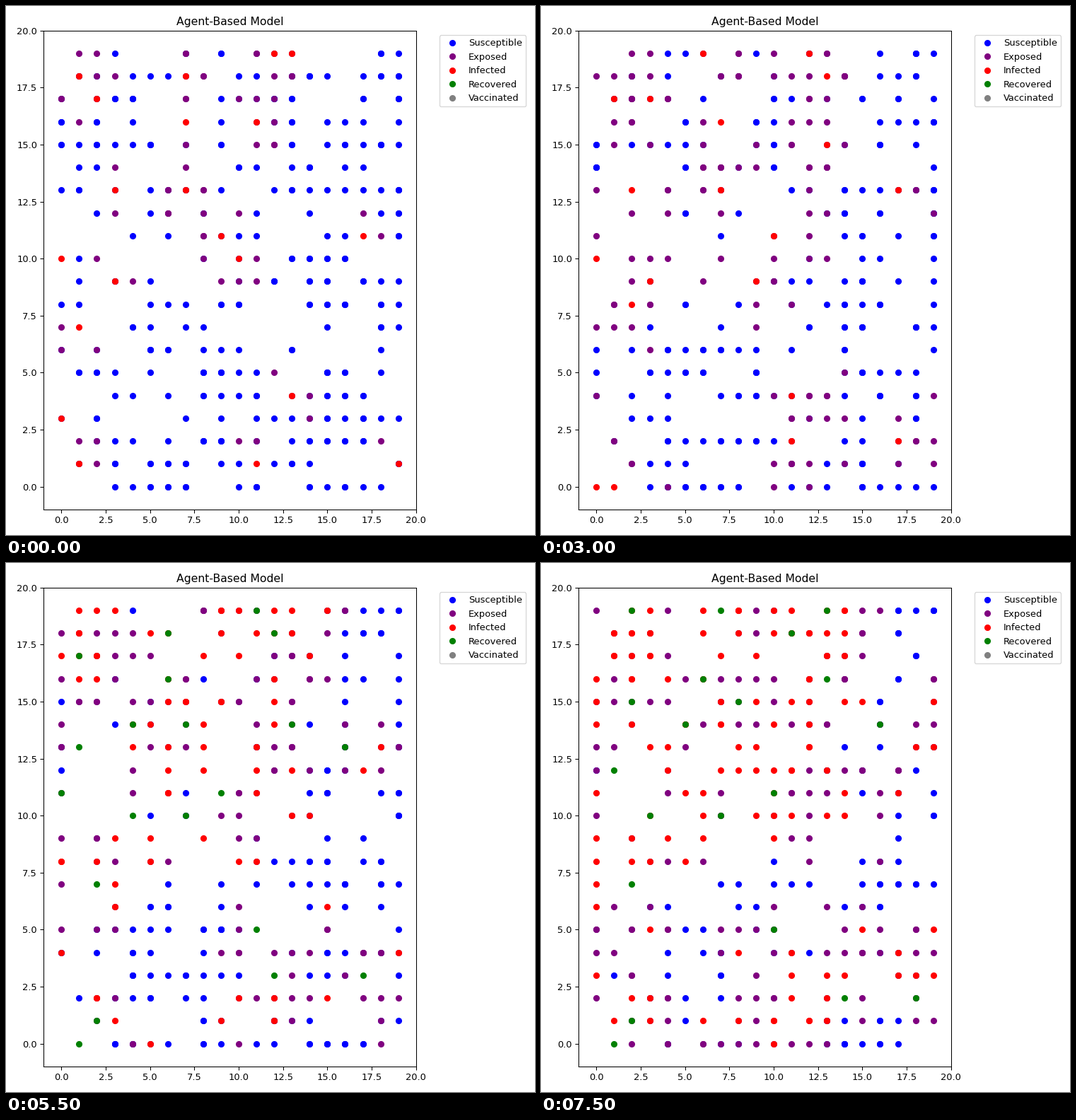
Recreate the animation shown at these times as a matplotlib script. Size 748 px wide and 748 px high, loop 8000 ms.

```python
import numpy as np
import matplotlib.pyplot as plt
from matplotlib.animation import FuncAnimation

STAGE, DPI = 748, 93.5
FRAMES, INTERVAL = 16, 500
SIZE, AGENTS, CASES = 20, 400, 20
INCUBATION, RECOVERY = 11, 9      # in steps
MOVE_CHANCE, START_RISK, RISK = 0.4, 0.5, 0.45

STATES = [("Susceptible", "blue"), ("Exposed", "purple"), ("Infected", "red"),
          ("Recovered", "green"), ("Vaccinated", "gray")]
MOVES = np.array([(1, 0), (-1, 0), (0, 1), (0, -1)])


def place(rng):
    """Scatter the agents; most first cases start on separate left cells."""
    pos = rng.integers(0, SIZE, (AGENTS, 2))
    cells = rng.choice(14 * SIZE, CASES, replace=False)
    pos[:CASES] = np.column_stack([cells // SIZE, cells % SIZE])
    pos[:2] = (17, 11), (19, 1)
    return pos


def wander(pos, rng):
    moving = rng.random((AGENTS, 1)) < MOVE_CHANCE
    return np.clip(pos + moving * rng.choice(MOVES, AGENTS), 0, SIZE - 1)


def expose(pos, caught, sick, step, reach, risk, rng):
    """Each sick agent may pass it on to healthy ones close by."""
    gap = ((pos[:, None] - pos[sick][None]) ** 2).sum(axis=2)
    contacts = (gap <= reach).sum(axis=1)
    hit = rng.random(AGENTS) < 1 - (1 - risk) ** contacts
    caught[hit & np.isinf(caught)] = step


def simulate():
    rng = np.random.default_rng(12)
    pos = place(rng)
    caught = np.full(AGENTS, np.inf)
    caught[:CASES] = -INCUBATION
    expose(pos, caught, caught < 0, 0, 2, START_RISK, rng)
    history = []
    for step in range(FRAMES):
        if step > 0:
            pos = wander(pos, rng)
            age = step - caught
            sick = (age >= INCUBATION) & (age < INCUBATION + RECOVERY)
            expose(pos, caught, sick, step, 1, RISK, rng)
        age = step - caught
        state = sum((age >= limit).astype(int)
                    for limit in (0, INCUBATION, INCUBATION + RECOVERY))
        history.append((pos, state))
    return history


history = simulate()

fig = plt.figure(figsize=(STAGE / DPI, STAGE / DPI), dpi=DPI)
left, right, bottom, top = 53.2, 579.8, 36, 713.4
ax = fig.add_axes([left / STAGE, bottom / STAGE,
                   (right - left) / STAGE, (top - bottom) / STAGE])
ticks = np.arange(0, SIZE + 0.1, 2.5)
ax.set(xlim=(-1, SIZE), ylim=(-1, SIZE), title="Agent-Based Model",
       xticks=ticks, yticks=ticks)
dots = [ax.plot([], [], "o", color=color, label=name)[0]
        for name, color in STATES]
ax.legend(loc="upper left", bbox_to_anchor=(1.05, 1))


def update(step):
    pos, state = history[step]
    for i, group in enumerate(dots):
        group.set_data(*pos[state == i].T)
    return dots


anim = FuncAnimation(fig, update, frames=FRAMES, interval=INTERVAL,
                     init_func=lambda: update(0), repeat=True, repeat_delay=0)
plt.show()
```
